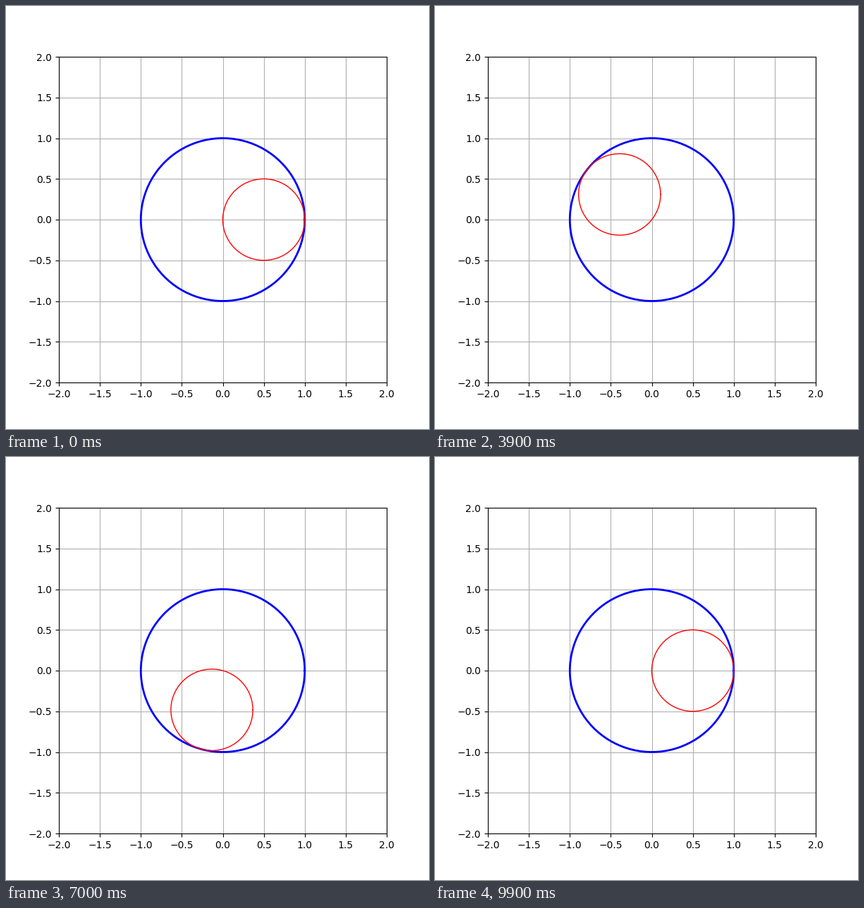
Animation, 600 px wide and 600 px high, one loop 10000 ms. Source, as a matplotlib script:

```python
import numpy as np
import matplotlib.pyplot as plt
from matplotlib.animation import FuncAnimation

FRAMES = 100
R, r = 1.0, 0.5

theta = np.linspace(0, 2 * np.pi, FRAMES)


def circle(radius, cx=0.0, cy=0.0):
    return cx + radius * np.cos(theta), cy + radius * np.sin(theta)


fig, ax = plt.subplots(figsize=(6, 6), dpi=100)
ax.set_xlim(-2, 2)
ax.set_ylim(-2, 2)
ax.grid(True)

ax.plot(*circle(R), color="blue", lw=2)
rolling, = ax.plot([], [], color="red", lw=1)


def update(i):
    # The small circle stays tangent to the inside of the big one.
    d, a = R - r, theta[i]
    rolling.set_data(*circle(r, d * np.cos(a), d * np.sin(a)))
    return rolling,


anim = FuncAnimation(fig, update, frames=FRAMES, interval=100,
                     repeat=True, repeat_delay=0)
plt.show()
```
